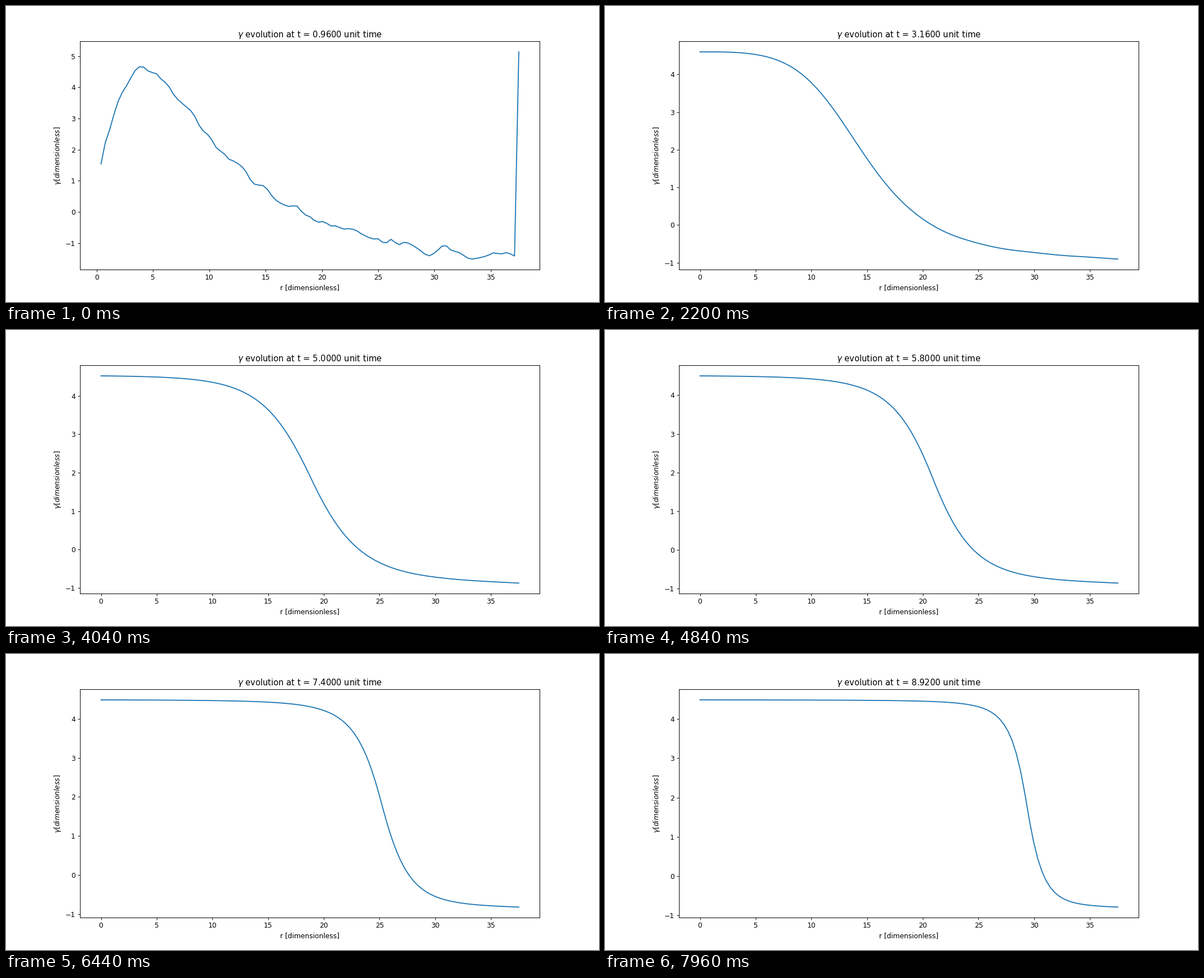
Write a matplotlib script that moves like this. It is 1058 px wide and 529 px high and loops after 8000 ms.

```python
import numpy as np
import matplotlib.pyplot as plt
from matplotlib.animation import FuncAnimation

FRAMES, INTERVAL = 200, 40
T0, DT = 0.96, 0.04
SMOOTH = 21              # frames until the noise has died out
RELAX = 2.4              # decay rate towards the smooth front

r = np.linspace(0, 37.5, 100)
dr = r[1]


def noisy_start():
    """Decaying profile with a central dip, noise and a spike at the rim."""
    rng = np.random.default_rng(4)
    noise = np.convolve(rng.normal(0, 0.07, r.size + 2), [0.5, 1, 0.5], "valid")
    rise = 0.18 + 0.82 * np.tanh(r / 5)
    g = -1.6 + 13.6 * np.exp(-0.118 * r) * rise + noise
    g = np.maximum(g, -1.52)
    g[1], g[-1] = 1.54, 5.135
    return g


def front(age):
    """Travelling front that speeds up and steepens, with fading traces."""
    centre = 9.7 + 2.75 * age + 3.33 * np.exp(-0.67 * age)
    width = 4 - 0.64 * age + 0.026 * age ** 2
    inner_tail = 0.135 - 0.435 * np.exp(-0.5 * age)
    x = r - centre
    tail = np.where(x < 0, inner_tail, 0.09)
    level = x / np.maximum(width + tail * abs(x), 0.1)
    drop = 1 / (1 + np.exp(-level))
    drop += (1 - drop[-1]) * (r / r[-1]) ** 6   # flatten at the rim

    top = 4.493 + 0.155 * np.exp(-0.14 * age ** 2)
    low = (-0.92 + 0.012 * age + 0.0009 * age ** 2
           - 0.06 * np.exp(-RELAX * age))
    dip = 0.365 * np.exp(-2.6 * age - (r / 2.1) ** 2)
    ripple = (0.027 * np.exp(-1.3 * age - ((r - 28) / 8) ** 4)
              * np.sin(1.14 * (r - 28.5)))
    return top - drop * (top - low) - dip + ripple


def close_ends(g):
    g[0], g[-1] = g[1], g[-2]
    return g


def diffuse(g, duration, step=0.01):
    """Radial diffusion with zero-flux ends."""
    g = close_ends(g.copy())
    for _ in range(round(duration / step)):
        curve = (g[2:] - 2 * g[1:-1] + g[:-2]) / dr ** 2
        slope = (g[2:] - g[:-2]) / (2 * dr)
        g[1:-1] += step * (curve + slope / r[1:-1])
        close_ends(g)
    return g


def build_profiles():
    start = noisy_start()
    settle = SMOOTH * DT
    gap = front(0) - diffuse(start, settle)
    full = 1 - np.exp(-RELAX * settle)
    profiles = [start]
    for n in range(1, FRAMES):
        t = n * DT
        if n < SMOOTH:
            share = (1 - np.exp(-RELAX * t)) / full
            profiles.append(diffuse(start, t) + share * gap)
        else:
            profiles.append(front(t - settle))
    return profiles


profiles = build_profiles()

fig, ax = plt.subplots(figsize=(12, 6), dpi=88.1667)   # 1058 x 529 pixels
line, = ax.plot([], [])
ax.set_xlabel("r [dimensionless]")
ax.set_ylabel(r"$\gamma [dimensionless]$")
title = ax.set_title("")


def draw(n):
    first = 1 if n == 0 else 0   # the centre point joins after the start
    line.set_data(r[first:], profiles[n][first:])
    ax.relim()
    ax.autoscale_view()
    title.set_text(rf"$\gamma$ evolution at t = {T0 + n * DT:.4f} unit time")
    return line, title


anim = FuncAnimation(fig, draw, frames=FRAMES, init_func=lambda: draw(0),
                     interval=INTERVAL, repeat=True, repeat_delay=0)
plt.show()
```
